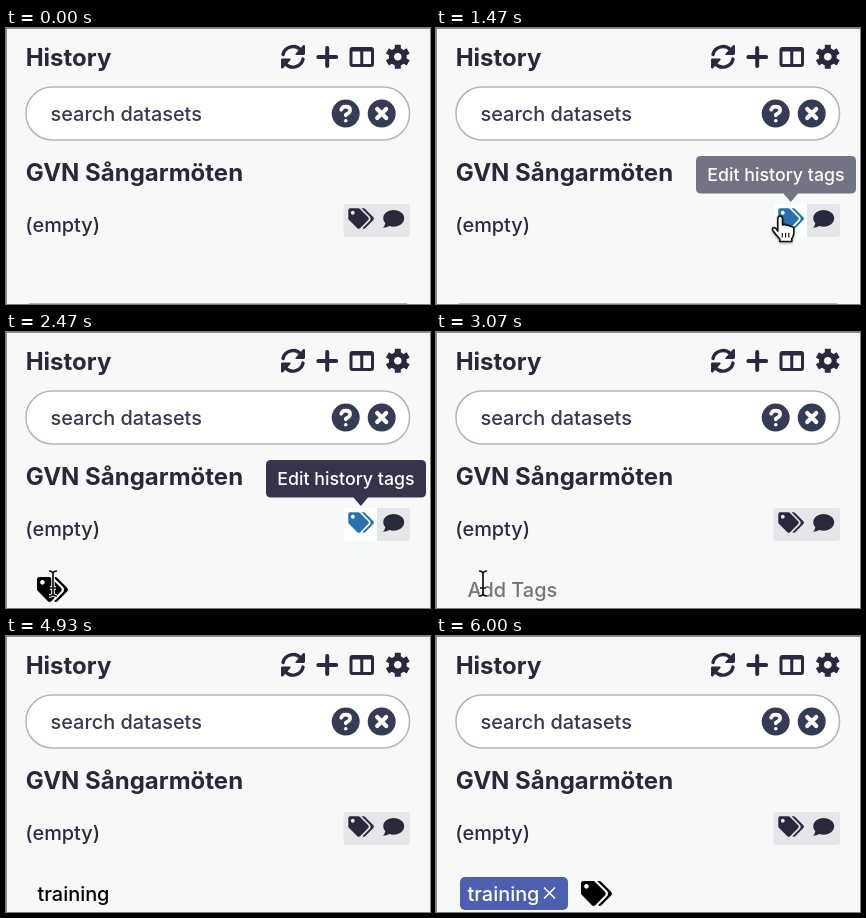
An HTML page for the animation above (8.6 s loop, 424 by 276 pixels).

```html
<!DOCTYPE html>
<html lang="en">
<head>
<meta charset="utf-8">
<title>Tagging a history</title>
<style>
  html, body { margin: 0; width: 100%; height: 100%; overflow: hidden; background: #f7f9f9; }
  svg { display: block; width: 100%; height: 100%; }
  text { font: 450 19.9px Inter, "Open Sans", sans-serif; fill: #2a2c3f; white-space: pre; }
  .title { font-size: 24px; font-weight: 700; fill: #272839; }
  .ink { fill: #272a3d; }
  .badge { fill: #363b55; }
  .line { fill: none; stroke: #272a3d; stroke-width: 3; }
  .white { fill: none; stroke: #fff; stroke-linecap: round; stroke-linejoin: round; }
  .pointer { filter: drop-shadow(0 1.5px 1.2px #0006); }
</style>
</head>
<body>
<svg viewBox="0 0 424 276">
  <defs>
    <path id="tags" fill-rule="evenodd" d="M0 2.4Q0 0 2.4 0H12.6Q13.6 0 14.3 .7L24.9 11.3Q26.5 13 24.9 14.7L14.7 24.9Q13 26.5 11.3 24.9L.7 14.3Q0 13.6 0 12.6ZM5.6 3.2a2.4 2.4 0 1 0 .01 0ZM16.6 0H19Q20 0 20.7 .7L31.3 11.3Q33 13 31.3 14.7L21.1 24.9Q19.4 26.5 17.7 24.9L26.4 16.2Q29.6 13 26.4 9.8Z"/>
    <g id="rotateHalf">
      <path class="line" style="stroke-width:3.4" stroke-linecap="round" d="M277 26.5A10.2 10.2 0 0 1 295 22.5"/>
      <path class="ink" d="M297.2 17.2Q299 16.6 299 18.4V25.6Q299 27 297.6 27H290.4Q288.600 27 289.800 25.400Z"/>
    </g>
    <path id="tooth" class="line" style="stroke-width:6" d="M0-12V-6M0 6V12"/>
    <path id="beamShape" d="M-4-12.5Q0-12.5 0-9.500Q0-12.500 4-12.500M0-9.500V9.500M-4 12.500Q0 12.500 0 9.500Q0 12.500 4 12.500M-3 4.500H3"/>
  </defs>
  <rect width="424" height="276" fill="#f7f9f9"/>
  <path d="M0 .5H424M.5 0V276" stroke="#8a8a8c" fill="none"/>

  <!-- header -->
  <text class="title" x="19.700" y="37.500">History</text>
  <use href="#rotateHalf"/>
  <use href="#rotateHalf" transform="rotate(180 287 28.8)"/>
  <path class="line" style="stroke-width:4" stroke-linecap="round" d="M312.300 29H330.200M321.200 20V38"/>
  <rect class="line" x="345" y="20.500" width="21.500" height="17" rx="1.500"/>
  <path class="line" d="M345 22H366.500M355.750 22V38"/>
  <g transform="translate(391.8 28.8)">
    <circle class="line" style="stroke-width:5.2" r="6.4"/>
    <use href="#tooth"/><use href="#tooth" transform="rotate(60)"/><use href="#tooth" transform="rotate(120)"/>
  </g>

  <!-- search -->
  <rect x="20" y="59" width="383.500" height="53" rx="26" fill="#fff" stroke="#afb5c6" stroke-width="1.500"/>
  <text x="44.500" y="92.800" style="fill:#353a52">search datasets</text>
  <circle class="badge" cx="339.700" cy="85.600" r="14"/>
  <path class="white" stroke-width="3.600" d="M335.200 81.800Q335.800 78.600 339.600 78.600Q344.200 78.600 344.200 82.200Q344.200 84.400 339.800 86.700V87.400M339.800 92.700v.1"/>
  <circle class="badge" cx="375.700" cy="85.600" r="14"/>
  <path class="white" stroke-width="4.200" d="M371.200 81.100l9 9m0-9l-9 9"/>

  <!-- history summary -->
  <text class="title" x="19.700" y="153">GVN Sångarmöten</text>
  <text x="19.300" y="204">(empty)</text>
  <rect x="337.500" y="176" width="66.500" height="33" rx="3" fill="#e4e7ea"/>
  <rect id="hoverBox" x="337.500" y="176" width="33.500" height="33" fill="#fdfefe"/>
  <use id="tagButton" href="#tags" transform="translate(342.3 180.3) scale(.8)"/>
  <path class="ink" d="M387.700 182C381.500 182 377.200 185.800 377.200 190.300Q377.200 193 379.300 195.200Q378.800 197.800 377 199.800Q380.800 199.800 383.300 198Q385.300 198.700 387.700 198.700C393.500 198.700 398.200 195 398.200 190.300S393.500 182 387.700 182Z"/>
  <path id="divider" d="M23 275.500H401" stroke="#b5b0b3"/>

  <!-- tag editor -->
  <clipPath id="reveal"><rect id="revealBox" x="0" y="236" width="424" height="40"/></clipPath>
  <g clip-path="url(#reveal)"><use id="tagIcon" href="#tags"/></g>
  <g id="chip">
    <rect x="24" y="241" width="108" height="33" rx="5" fill="#4d5fb0"/>
    <text x="31.500" y="264.500" style="fill:#fff">training</text>
    <path class="white" stroke-width="1.700" d="M108.500 252l10 10m0-10l-10 10"/>
  </g>
  <text id="placeholder" y="264.500" style="fill:#73757b">Add Tags</text>
  <text id="typed" x="31.500" y="264.500" style="fill:#000"></text>
  <rect id="caret" y="246" width="1.500" height="23"/>

  <g id="tooltip">
    <path fill="#33364a" d="M265 128H415Q420 128 420 133V160.500Q420 165.500 415 165.500H362L354.800 174L347.500 165.500H265Q260 165.500 260 160.500V133Q260 128 265 128Z"/>
    <text x="271.300" y="153.300" style="fill:#fff;font-size:17.8px">Edit history tags</text>
  </g>

  <!-- pointers -->
  <path id="arrow" class="pointer" stroke="#fff" stroke-width="1.800" d="M0 0V21L4.800 16.800L8 25.500L12.200 23.800L8.800 15.500H15.200Z"/>
  <g id="hand" class="pointer" stroke="#111" stroke-width="1.600" fill="#fff" stroke-linejoin="round">
    <path d="M-3 15V3Q-3 0 -.7 0T1.700 3V9Q4 7.500 5.800 9.500Q8 8.500 9.500 10.500Q13 10 13 13V17Q13 20 11 22.500V25.500H-1V23Q-4 20 -8 14.500Q-9 12 -7 11.500Q-5 11.500 -3 15Z"/>
    <path d="M1.500 17v4.500M4.800 17v4.500M8 17v4.500" stroke-width="1.200"/>
  </g>
  <g id="beam" fill="none">
    <use href="#beamShape" stroke="#fff" stroke-width="3.500"/>
    <use href="#beamShape" stroke="#111" stroke-width="1.700"/>
  </g>
</svg>
<script>
const $ = id => document.getElementById(id);
const LOOP = 8600, TICK = 200 / 3;   // the screen refreshes 15 times a second
const KEY_TICKS = [51, 52, 54, 56, 57, 63, 64, 66];
const WORD = "training";

const clamp = v => Math.max(0, Math.min(1, v));
const easeOut = p => 1 - (1 - p) ** 2;
const mix = (a, b, p) => a + (b - a) * p;
const curve = (a, b, c, p) => mix(mix(a, b, p), mix(b, c, p), p);
const show = (id, on) => $(id).style.display = on ? "" : "none";
const place = (id, x, y, scale = 1) =>
  $(id).setAttribute("transform", `translate(${x} ${y}) scale(${scale})`);

function drawPointer(k) {
  const moving = k >= 34 && k < 37;
  show("arrow", k >= 4 && k < 20 || moving);
  show("hand", k >= 20 && k < 34);
  show("beam", k >= 37 && k < 51 || k >= 82 && k < 86);
  if (moving) {
    const p = easeOut((k - 33) / 4);
    place("arrow", mix(345, 47, p), mix(190, 251, p));
  } else {
    const p = easeOut(clamp((k - 4) / 5));
    place("arrow", curve(330, 358, 342.3, p), curve(228, 205, 185, p));
  }
  place("hand", 344.8, 188);
  const leave = clamp((k - 82) / 4);
  if (k < 82) place("beam", 47, 251.5);
  else place("beam", mix(80, 110, leave), mix(251.5, 290, leave ** 2));
}

function drawEditor(k) {
  const open = clamp((k - 23) / 6), height = 40 * open * open * (3 - 2 * open);
  $("revealBox").setAttribute("height", height);
  place("divider", 0, height);

  const tagged = k >= 75, blurred = k >= 90;
  show("chip", tagged);
  show("tagIcon", k < 39 || blurred);
  place("tagIcon", blurred ? 145 : 31, 245, .97);
  show("placeholder", k >= 39 && k < 51 || tagged && !blurred);
  $("placeholder").setAttribute("x", tagged ? 146.5 : 31.5);

  const count = tagged ? 0 : KEY_TICKS.filter(key => k >= key).length;
  $("typed").textContent = WORD.slice(0, count);
  show("caret", k >= 39 && k < 46 || k >= 51 && k < 74 || tagged && k < 82);
  const caretX = tagged ? 147 : 32 + (count ? $("typed").getComputedTextLength() : 0);
  $("caret").setAttribute("x", caretX);
}

function draw(ms) {
  const k = Math.floor((ms % LOOP + 4) / TICK) % 129;
  const hovered = k >= 20 && k < 39;
  show("hoverBox", hovered);
  $("tagButton").setAttribute("fill", hovered ? "#2a6fae" : "#272a3d");
  $("tooltip").style.opacity = k < 38 ? clamp((k - 20) * .34) : clamp((41 - k) * .34);
  drawEditor(k);
  drawPointer(k);
}

const start = performance.now();
function frame() {
  draw(performance.now() - start);
  requestAnimationFrame(frame);
}
frame();
</script>
</body>
</html>
```
